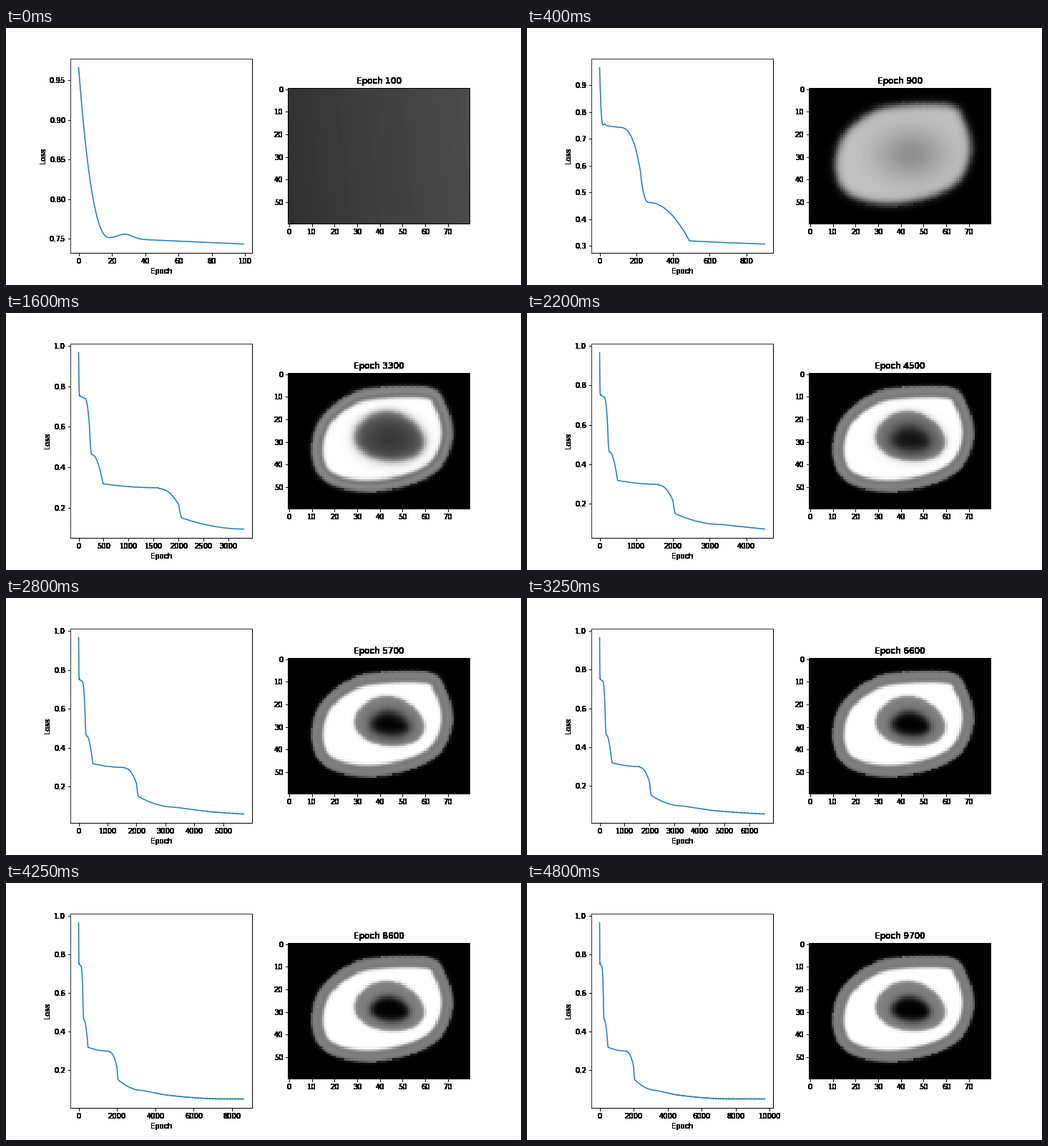
Recreate the animation shown at these times as a matplotlib script. Size 720 by 360 pixels, loop 4850 ms.

```python
import numpy as np
import matplotlib.pyplot as plt
from matplotlib.animation import FuncAnimation
from matplotlib.path import Path

plt.rcParams.update({
    "font.family": "DejaVu Sans", "font.size": 10,
    "axes.linewidth": 1, "figure.subplot.bottom": 0.125,
})

FRAMES, STEP = 97, 100
ROWS, COLS = 60, 80
CELL, LEFT, TOP = 3.17, 394.4, 84


# --- loss curve -----------------------------------------------------------
# (end epoch, end loss, power): power > 0 speeds up, power < 0 slows down
STAGES = [
    (19, 0.7508, -2.4), (99, 0.7432, 1), (222, 0.58, 3), (275, 0.462, -3),
    (490, 0.3187, 1.9), (1600, 0.299, -2), (1612, 0.2945, 1),
    (2000, 0.2165, 2.1), (2065, 0.15, -1.5), (3300, 0.0953, -1.9),
    (4500, 0.072, 1), (7400, 0.0505, -1.6), (9700, 0.05, 1),
]


def ease(t, power):
    return t ** power if power > 0 else 1 - (1 - t) ** -power


epochs = np.arange(FRAMES * STEP)
trend = np.empty(len(epochs))
start, level = 0, 0.966
for end, goal, power in STAGES:
    t = np.arange(end - start) / (end - start)
    trend[start:end] = level + (goal - level) * ease(t, power)
    start, level = end, goal

# One early overshoot, then small regular spikes late in the training
overshoot = 0.0057 * np.exp(-((epochs - 28) / 6) ** 2)
spikes = (0.003 * np.clip((epochs - 3400) / 4000, 0, 1)
          * np.exp(-((epochs + 60) % 150) / 8))
loss = trend + overshoot + spikes


# --- picture --------------------------------------------------------------
row, col = np.mgrid[:ROWS, :COLS]
cells = np.column_stack([col.ravel(), row.ravel()])


def spline(points, n=16):
    """Closed Catmull-Rom curve through the points."""
    p = np.array(points, float)
    a, c, d = np.roll(p, 1, 0), np.roll(p, -1, 0), np.roll(p, -2, 0)
    t = (np.arange(n) / n)[:, None, None]
    curve = p + 0.5 * t * (c - a + t * (2 * a - 5 * p + 4 * c - d
                                        + t * (3 * (p - c) + d - a)))
    return curve.transpose(1, 0, 2).reshape(-1, 2)


def egg(cx, cy, rx, ry, taper=0.15, tilt=0.1):
    """Ellipse that is wider at the bottom and sinks to the right."""
    t = np.linspace(0, 2 * np.pi, 160)
    return np.column_stack([cx + rx * np.cos(t) * (1 + taper * np.sin(t)),
                            cy + ry * np.sin(t + tilt)])


def depth(outline):
    """Signed distance in cells to an outline in pixels, inside positive."""
    curve = (outline - (LEFT, TOP)) / CELL - 0.5
    dist = np.sqrt(((cells[:, None] - curve) ** 2).sum(2)).min(1)
    inside = Path(curve).contains_points(cells)
    return np.where(inside, dist, -dist).reshape(ROWS, COLS)


def soft(d, width):
    return 1 / (1 + np.exp(-np.clip(d / width, -60, 60)))


skin = depth(spline([(520, 105), (592, 105), (614, 126), (625, 170),
                     (611, 213), (575, 238), (518, 250.5), (468, 246),
                     (437, 227), (427, 190), (440, 148), (478, 116)]))
body = skin - 5.2
ring = depth(egg(536.5, 173, 48.5, 35))
core = depth(egg(537, 177, 26, 17))
groove = np.exp(-((skin - 4) / 1.1) ** 2)
dip = np.exp(-((col - 44.5) / 15) ** 2 - ((row - 29) / 11) ** 2)


def layered(core_width):
    return (0.5 * soft(skin, 0.35) + 0.5 * soft(body, 0.35)
            - 0.5 * soft(ring, 0.4) - 0.5 * soft(core, core_width)
            - 0.03 * groove)


# Learned picture at key epochs; the loss drives the blend between them
KEYS = [
    (100, 0.2 + 0.1 * col / COLS - 0.008 * row / ROWS),
    (300, 0.62 * soft(skin - 2, 4)),
    (500, 0.69 * soft(skin - 1.8, 1.7)),
    (900, 0.76 * soft(skin - 1.5, 1.0) - 0.2 * dip),
    (1600, 0.8 * soft(skin - 1.4, 1.0) - 0.36 * dip),
    (2000, 0.55 * soft(skin - 1, 1.0) + 0.42 * soft(body - 0.5, 1.3)
     - 0.88 * soft(core + 1.8, 1.4)),
    (2100, 0.52 * soft(skin - 0.4, 0.8) + 0.48 * soft(body, 0.9)
     - 0.85 * soft(ring - 1.5, 1.3)),
    (3300, 0.54 * soft(skin, 0.45) + 0.48 * soft(body, 0.45)
     - 0.6 * soft(ring, 0.9) - 0.2 * dip - 0.09 * groove),
    (5700, layered(1.3)),
    (9700, layered(0.9)),
]


def picture(epoch):
    i = 0
    while i < len(KEYS) - 2 and epoch > KEYS[i + 1][0]:
        i += 1
    (e0, p0), (e1, p1) = KEYS[i], KEYS[i + 1]
    l0, l1 = trend[e0 - 1], trend[e1 - 1]
    w = np.clip((trend[epoch - 1] - l0) / (l1 - l0), 0, 1)
    return np.clip(p0 + w * (p1 - p0), 0, 1)


# --- figure ---------------------------------------------------------------
def harden(img, dpi):
    """Hard-edged lettering: every touched pixel becomes solid."""
    out = img.copy()
    out[..., 3] = img[..., 3] > 0
    return out, 0, 0


fig, (plot, view) = plt.subplots(1, 2, figsize=(10, 5), dpi=72)
line, = plot.plot([], [])
plot.set_xlabel("Epoch")
plot.set_ylabel("Loss")
plot.spines[["left", "top"]].set_color("0.2")
image = view.imshow(KEYS[0][1], cmap="gray", vmin=0, vmax=1,
                    interpolation="nearest")
title = view.set_title("")
for part in (plot.xaxis, plot.yaxis, view.xaxis, view.yaxis, title):
    part.set_agg_filter(harden)


def limits(lo, hi):
    pad = 0.05 * (hi - lo)
    return lo - pad, hi + pad


def update(i):
    n = (i + 1) * STEP
    line.set_data(epochs[:n], loss[:n])
    plot.set_xlim(limits(0, n - 1))
    plot.set_ylim(limits(loss[:n].min(), loss[:n].max()))
    image.set_data(picture(n))
    title.set_text(f"Epoch {n}")
    return line, image, title


anim = FuncAnimation(fig, update, frames=FRAMES, interval=50, repeat=True,
                     repeat_delay=0)
plt.show()
```
